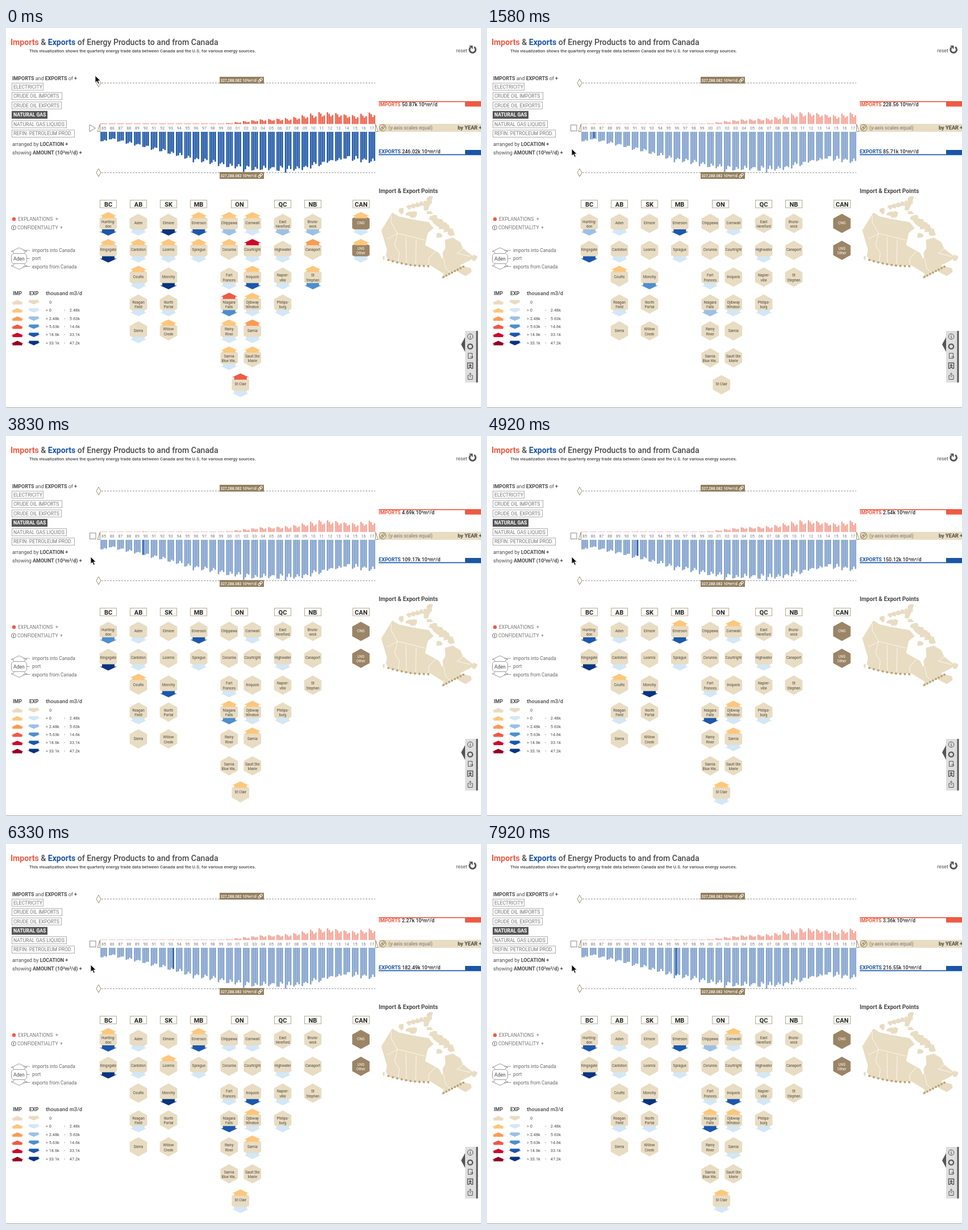
Write an HTML page that moves like this. It is 836 px wide and 670 px high and loops after 8000 ms.

```html
<!DOCTYPE html>
<html lang="en">
<head>
<meta charset="utf-8">
<title>Energy imports and exports</title>
<style>
html, body { margin: 0; width: 100%; height: 100%; overflow: hidden; background: #fff; }
svg { display: block; width: 836px; height: 670px; font-family: Roboto, "Open Sans", sans-serif; }
text { white-space: pre; }
.b { font-weight: 700; }
</style>
</head>
<body>
<svg id="stage" viewBox="0 0 836 670"></svg>
<script>
const RED = '#ee5a42', BLUE = '#1b55a6', SAND = '#e8dcc2', BROWN = '#93805f', INK = '#4a4a4a', GRAY = '#777';
const IMPORT_COLORS = ['none', '#fdc77d', '#fb9b57', '#ee5a46', '#cb0a2b', '#930020'];
const EXPORT_COLORS = ['none', '#d3e7f5', '#9dc0e6', '#4f8ecd', '#1c57ab', '#08347f'];
const LOOP = 8000, FIRST_STEP = 430, STEP = 165, LAST_QUARTER = 45, GROWTH = 14;

const mix = (a, b, p) => a + (b - a) * p;
// Linear path through key points [at, value].
function along(points, at) {
  const i = Math.max(1, points.findIndex(p => p[0] >= at));
  const [t0, a] = points[i - 1], [t1, b] = points[i];
  return mix(a, b, Math.max(0, (at - t0) / (t1 - t0)));
}

// Bar heights by year since 1985, totals by quarter.
const EXPORT_TREND = [[0, 15.8], [1, 12.8], [6, 29], [11, 49], [17, 64.5], [23, 66], [29, 45], [32, 51]];
const IMPORT_TREND = [[0, 0], [14, 0], [19, 6.7], [22, 8], [26, 16], [27, 16.5], [30, 12], [32, 15.6]];
const IMPORT_TOTAL = [[1, 5.13], [12, 496.67], [20, 4690], [27, 2540], [35, 2270], [45, 3360]];
const EXPORT_TOTAL = [[1, 64220], [12, 111490], [20, 109170], [27, 150120], [35, 182490], [45, 216550]];

// A port has overall import and export levels; during play its exports start at quarter `from`
// with `level` and grow by one per GROWTH quarters up to `peak`. Imports last for spans of quarters.
const port = (name, buys, sells, { from = -2, level = sells, peak = sells, imports = [] } = {}) =>
  ({ name, buys, sells, from, level, peak, imports });
const IDLE = { level: 0, peak: 0 };
const COLUMNS = [
  [180, 0, port('Hunting-/don', 1, 4, { level: 2, imports: [[31, 40]] }), port('Kingsgate', 1, 5, { level: 4 })],
  [233, 0, port('Aden', 0, 1), port('Cardston', 1, 1), port('Coutts', 1, 1, { ...IDLE, imports: [[0, 31]] }),
    port('Reagan/Field', 0, 1), port('Sierra', 0, 1, IDLE)],
  [286, 0, port('Elmore', 0, 5, IDLE), port('Loomis', 1, 1, { ...IDLE, imports: [[31, 40]] }),
    port('Monchy', 0, 5, { level: 3 }), port('North/Portal', 0, 1, { from: 40 }), port('Willow/Creek', 1, 0)],
  [339.3, 0, port('Emerson', 1, 4, { imports: [[24, 40]] }), port('Sprague', 1, 1)],
  [392.7, 0, port('Chippawa', 1, 2, { from: 31, level: 1 }), port('Corunna', 1, 0), port('Fort/Frances', 0, 1),
    port('Niagara/Falls', 3, 3, { from: -1, level: 2, peak: 4, imports: [[16, 23], [40, 99]] }),
    port('Rainy/River', 1, 1, IDLE), port('Sarnia/Blue Wa..', 1, 1, IDLE)],
  [433.7, 0, port('Cornwall', 1, 1, { imports: [[24, 31], [40, 99]] }), port('Courtright', 4, 1, IDLE),
    port('Iroquois', 1, 4, { from: 30 }), port('Ojibway/Windsor', 1, 1, { imports: [[7, 99]] }),
    port('Sarnia', 2, 1, { from: 24, imports: [[16, 40]] }), port('Sault Ste/Marie', 1, 0)],
  [412.7, 6, port('St Clair', 3, 1, { from: 24, imports: [[16, 99]] })],
  [487, 0, port('East/Hereford', 0, 2, IDLE), port('Highwater', 0, 1, { from: 6 }),
    port('Napier-/ville', 0, 1, { from: 31 }), port('Philips-/burg', 0, 1)],
  [540, 0, port('Bruns-/wick', 0, 2, IDLE), port('Canaport', 2, 0), port('St/Stephen', 1, 3, IDLE)],
  [624.6, 0, port('CNG', 1, 1, IDLE), port('LNG/Other', 1, 1, IDLE)]
];
const PORTS = COLUMNS.flatMap(column => column.slice(2));
const PROVINCES = { BC: 180, AB: 233, SK: 286, MB: 339, ON: 411, QC: 487, NB: 540, CAN: 625 };

const importLevel = (p, q) => q < 0 ? p.buys : +p.imports.some(([a, b]) => q >= a && q < b);
const exportLevel = (p, q) => q < 0 ? p.sells
  : q < p.from ? 0 : Math.min(p.peak, p.level + Math.floor((q - p.from) / GROWTH));

let out = '';
const add = s => { out += s; };
const path = (d, fill = 'none', stroke = 'none', w = 1, more = '') =>
  add(`<path d="${d}" fill="${fill}" stroke="${stroke}" stroke-width="${w}" ${more}/>`);
const rect = (x, y, w, h, fill, stroke = 'none', more = '') =>
  add(`<rect x="${x}" y="${y}" width="${w}" height="${h}" fill="${fill}" stroke="${stroke}" ${more}/>`);
const circle = (x, y, r, fill, stroke = 'none', w = 1) =>
  add(`<circle cx="${x}" cy="${y}" r="${r}" fill="${fill}" stroke="${stroke}" stroke-width="${w}"/>`);
const text = (x, y, s, size, fill = INK, more = '') =>
  add(`<text x="${x}" y="${y}" font-size="${size}" fill="${fill}" ${more}>${s}</text>`);
const bold = (s, fill = INK) => `<tspan class="b" fill="${fill}">${s}</tspan>`;
const MIDDLE = 'text-anchor="middle" ', BOLD = 'class="b"', MEDIUM = 'font-weight="500"';
const link = (x, y, color) => add(`<g transform="translate(${x} ${y}) rotate(-42)" fill="none" stroke="${color}">
  <rect x="-4.5" y="-1.7" width="5" height="3.4" rx="1.7"/><rect x="-.5" y="-1.7" width="5" height="3.4" rx="1.7"/></g>`);
const arrow = (x, tip, dir, wing, slope, body, notch) =>
  `M${x} ${tip}l${wing} ${-slope * dir}h${-notch}v${-body * dir}h${2 * (notch - wing)}v${body * dir}h${-notch}z`;

function header() {
  text(8, 30, `${bold('Imports', RED)} &amp; ${bold('Exports', BLUE)} of Energy Products to and from Canada`, 14.1, INK, MEDIUM);
  text(41, 43, 'This visualization shows the quarterly energy trade data between Canada and the U.S. for various energy sources.', 7.87, INK, MEDIUM);
  text(792, 43, 'reset', 8.9, '#555');
  path('M817.5 34.2A5.4 5.4 0 1 0 824 33.6', 'none', '#555', 3);
  path('M815 31h6.5v6.5z', '#555');
  rect(0, 669, 836, 1, '#a6a6a6');
}

function menu() {
  text(11, 91.5, `${bold('IMPORTS')} and ${bold('EXPORTS')} of ${bold('+')}`, 8.9);
  const items = { 'ELECTRICITY': 56, 'CRUDE OIL IMPORTS': 89, 'CRUDE OIL EXPORTS': 88, 'NATURAL GAS': 63,
    'NATURAL GAS LIQUIDS': 97, 'REFIN. PETROLEUM PROD.': 111 };
  Object.entries(items).forEach(([label, w], i) => {
    const y = 97.2 + 16.55 * i, on = label === 'NATURAL GAS';
    rect(10.5, y, w - 1, 12.5, on ? '#555' : '#fff', on ? '#555' : '#aaa');
    text(13, y + 9.5, label, 8.6, on ? '#fff' : GRAY, on ? BOLD : '');
  });
  text(11, 207.5, `arranged by ${bold('LOCATION +')}`, 8.9);
  text(11, 222.5, `showing ${bold('AMOUNT (10³m³/d) +')}`, 9);
}

function legend() {
  circle(14, 337, 3.2, RED);
  text(21, 340.3, 'EXPLANATIONS', 8.5, GRAY);
  text(87, 340.3, '+', 8.5, GRAY);
  circle(13.5, 352, 4, '#fff', GRAY);
  text(13.5, 354.6, '!', 7, INK, MIDDLE + BOLD);
  text(20, 355.3, 'CONFIDENTIALITY', 8.6, GRAY);
  text(95, 355.3, '+', 8.5, GRAY);
  path(arrow(23, 387.5, -1, 14, 6.5, 3.5, 4) + arrow(23, 425.5, 1, 14, 6.5, 3.5, 4), '#fff', '#999');
  path('M9.5 401L13 397.5H33L36.5 401V412L33 415.5H13L9.5 412Z', '#fff', '#999');
  path('M30 392H42M36 406.5H42M30 420.5H42', 'none', '#999');
  text(23, 409.5, 'Aden', 8.6, INK, MIDDLE);
  ['imports into Canada', 'port', 'exports from Canada'].forEach((s, i) => text(46, 395 + 14.4 * i, s, 8.4, '#666'));

  text(12, 471, 'IMP', 8.8, INK, BOLD);
  text(41, 471, 'EXP', 8.8, INK, BOLD);
  text(70, 471, 'thousand m3/d', 9.4, INK, MEDIUM);
  const limits = ['0', '2.48k', '5.63k', '14.6k', '33.1k', '47.2k'];
  limits.forEach((limit, i) => {
    const y = 483.2 + 14.4 * i;
    path(arrow(20, y - 3.6, -1, 11, 4.8, 3, 2.5), i ? IMPORT_COLORS[i] : SAND);
    path(arrow(49, y + 4.2, 1, 11, 4.8, 3, 2.5), i ? EXPORT_COLORS[i] : SAND);
    if (!i) return text(76, y + 2.6, '0', 7.4);
    text(70, y + 2.6, '&gt; ' + limits[i - 1], 7.4);
    text(102, y + 2.6, '-', 7.4);
    text(130, y + 2.6, limit, 7.4, INK, 'text-anchor="end"');
  });
}

function chart() {
  for (const [y, top] of [[97, 86], [255, 254]]) {
    path(`M168 ${y}H650`, 'none', '#8c8c8c', 1, 'stroke-dasharray="3 2"');
    path(`M163 ${y - 7}l4 7l-4 7l-4 -7z`, '#fff', '#9a8a6c');
    rect(376, top, 78, 12, BROWN);
    text(377.5, top + 8.8, '327,288.082 10³m³/d', 6.6, '#fff', MEDIUM);
    link(447.5, top + 6, '#fff');
  }
  add('<g id="bars">');
  for (let q = 0; q < 132; q++) {
    const year = q >> 2, season = Math.cos((q % 4) * Math.PI / 2 - .3), noise = 1 + .03 * Math.sin(q * q * 7.3);
    const down = Math.min(72, along(EXPORT_TREND, year) * (1 + .07 * season) * noise);
    const up = Math.max(.9, along(IMPORT_TREND, year) * (1.04 + .25 * season) * noise);
    const x = 166.3 + 14.75 * year + 3 * (q % 4);
    add('<g>');
    rect(x, 169.3 - up, 2.5, up, RED);
    rect(x, 183, 2.5, down, BLUE);
    add('</g>');
  }
  add('</g>');
  for (let i = 0; i < 33; i++)
    text(172 + 14.75 * i, 178.7, String((85 + i) % 100).padStart(2, '0'), 7, GRAY, MIDDLE);
  path('M161 182.5L165.5 169.5V182.5ZM650.5 182.5V169.5L655 182.5Z', '#fff', '#9a8a6c');
  path('M147 170.5L157.5 176.5L147 182.5Z', '#fff', '#888', 1, 'id="play"');
  rect(147.5, 171, 10.5, 10.5, '#fff', '#888', 'id="stop"');
}

function totals() {
  rect(656, 129, 180, 1.7, RED);
  rect(808, 129, 28, 9.5, RED);
  rect(656, 222.5, 180, 1.7, BLUE);
  rect(808, 215, 28, 9, BLUE);
  text(656, 138.4, `${bold('IMPORTS ', RED)}<tspan id="importTotal"/>`, 8.9, '#222', MEDIUM);
  text(656, 221.3, `${bold('EXPORTS ', BLUE)}<tspan id="exportTotal"/>`, 8.9, '#222', MEDIUM);
  rect(656, 169, 180, 14, SAND);
  circle(663, 176, 6, 'none', BROWN);
  link(663, 176, BROWN);
  text(673, 179.3, '(y-axis scales equal)', 8.6, GRAY);
  text(795, 179.3, 'by YEAR +', 9.2, INK, BOLD);
}

function ports() {
  for (const [name, x] of Object.entries(PROVINCES)) {
    rect(x - 14.5, 303.5, 29, 13.5, '#fff', '#b5a88e');
    text(x, 314.5, name, 11, '#222', MIDDLE + BOLD);
  }
  for (const [x, row, ...list] of COLUMNS) {
    list.forEach(({ name }, i) => {
      const y = 344.5 + 47.4 * (row + i), dark = x > 600, lines = name.split('/');
      path(`M${x} ${y - 17}l15.3 8.5v17l-15.3 8.5l-15.3 -8.5v-17z`, dark ? '#9b8566' : SAND);
      path(arrow(x, y - 20, -1, 15, 7, 4, 4), 'none', 'none', 1, 'class="in"');
      path(arrow(x, y + 21.5, 1, 15, 7, 4, 4), 'none', 'none', 1, 'class="out"');
      lines.forEach((s, n) => text(x, y + (lines.length > 1 ? -1 + 8.4 * n : 1.4), s, 6.4, dark ? '#fff' : '#4c463c', MIDDLE));
    });
  }
}

// Rough island: an ellipse with a wobbling edge.
function island(x, y, w, h) {
  const edge = Array.from({ length: 11 }, (_, i) => {
    const a = i * Math.PI * 2 / 11, r = 1 + .28 * Math.sin(i * i * 5.1 + x);
    return `${(x + w * r * Math.cos(a)).toFixed(1)} ${(y + h * r * Math.sin(a)).toFixed(1)}`;
  });
  path(`M${edge.join('L')}Z`, SAND);
}

function map() {
  text(656, 290.5, 'Import &amp; Export Points', 10.2, INK, BOLD);
  path(`M680 326L692 333L716 338L744 343L752 353L742 361L737 383L762 397L767 407L770 405L769 396L774 388L773 374L786 370
    L799 378L804 389L822 403L817 409L797 419L818 424L819 430L809 437L791 427L767 442L771 433L747 418L715 419L675 410
    L669 402L671 391L661 357Z`, SAND, SAND, 1, 'stroke-linejoin="round"');
  island(665, 405, 2, 4);
  island(824, 405, 4.5, 5);
  island(762, 366, 5, 4);
  island(696, 322, 5, 6);
  island(715, 328, 11, 6);
  island(745, 326, 6, 3);
  for (let i = 0; i < 5; i++) island(710 + 7 * i, 315 - 1.5 * i, 4, 4);
  for (let i = 0; i < 4; i++) island(739 + 2.6 * i, 318 - 6 * i, 5, 5);
  for (let i = 0; i < 5; i++) island(753 + 7.5 * i, 335 + 6.5 * i, 7, 7);
  path('M678 330V343L689 362L671 372M689 362L738 374M689 362L684 383L692 396L690 414M704 368L705 417M722 373L721 419M755 394L744 407V418M770 406L774 424L782 431M804 389L794 397L818 403',
    'none', '#fff', .8);
  for (let i = 0; i < 10; i++) circle(673 + 7.8 * i, 420 - 11 * (1 - i / 9) ** 2, 2, '#b9a274');
  for (let i = 0; i < 8; i++) circle(770 + 5 * i, 439 - 2.6 * i, 2, '#b9a274');
}

function toolbar() {
  rect(808, 534, 20, 91, '#dedede');
  rect(827.5, 534, 3, 91, '#555');
  path('M801 558L808 545V571Z', '#555');
  circle(817, 544, 4.8, 'none', '#555');
  text(817, 547, 'i', 8, '#555', MIDDLE + BOLD);
  circle(817, 561.5, 4.2, 'none', '#555', 2.2);
  path('M813.5 573.5H820.5V582.5H813.5ZM817 580H822M820 578L822 580L820 582', 'none', '#555');
  path('M812.5 590.5H821.5V600H819L817 597L815 600H812.5Z', 'none', '#555', 1.4);
  path('M817 592L820 596H814Z', '#555');
  path('M815 612.5H813V619.5H821V612.5H819M817 616V608.5M815 610.5L817 608.5L819 610.5', 'none', '#555');
}

[header, menu, legend, chart, totals, ports, map, toolbar].forEach(part => part());
path('M0 0V12.5L3 9.8L5.2 14.6L7.4 13.6L5.3 9H9.3Z', '#111', '#fff', .8, 'id="cursor"');

const $ = id => document.getElementById(id);
$('stage').innerHTML = out;
const bars = [...$('bars').children];
const inArrows = document.querySelectorAll('.in'), outArrows = document.querySelectorAll('.out');
const amount = v => (v < 1000 ? v.toFixed(2) : (v / 1000).toFixed(2) + 'k') + ' 10³m³/d';

// A negative quarter shows the overview of all years.
let shown = null;
function showQuarter(quarter) {
  if (quarter === shown) return;
  shown = quarter;
  const running = quarter >= 0;
  bars.forEach((bar, q) => bar.setAttribute('opacity', !running || q === quarter ? 1 : .56));
  PORTS.forEach((p, i) => {
    inArrows[i].setAttribute('fill', IMPORT_COLORS[importLevel(p, quarter)]);
    outArrows[i].setAttribute('fill', EXPORT_COLORS[exportLevel(p, quarter)]);
  });
  $('importTotal').textContent = amount(running ? along(IMPORT_TOTAL, quarter) : 50870);
  $('exportTotal').textContent = amount(running ? along(EXPORT_TOTAL, quarter) : 246020);
  $('play').style.display = running ? 'none' : '';
  $('stop').style.display = running ? '' : 'none';
}

// The pointer goes down to the play button, clicks, then moves aside.
const ease = p => { p = Math.min(1, Math.max(0, p)); return p * p * (3 - 2 * p); };
function movePointer(t) {
  const toButton = ease((t - 60) / 210), aside = ease((t - FIRST_STEP) / 190);
  const x = 157 - 5 * toButton - 3 * aside, y = 84 + 92 * toButton + 37 * aside;
  $('cursor').setAttribute('transform', `translate(${x} ${y})`);
}

const start = performance.now();
function draw() {
  const t = (performance.now() - start) % LOOP;
  showQuarter(Math.max(-1, Math.min(LAST_QUARTER, Math.floor((t - FIRST_STEP) / STEP))));
  movePointer(t);
  requestAnimationFrame(draw);
}
draw();
</script>
</body>
</html>
```
